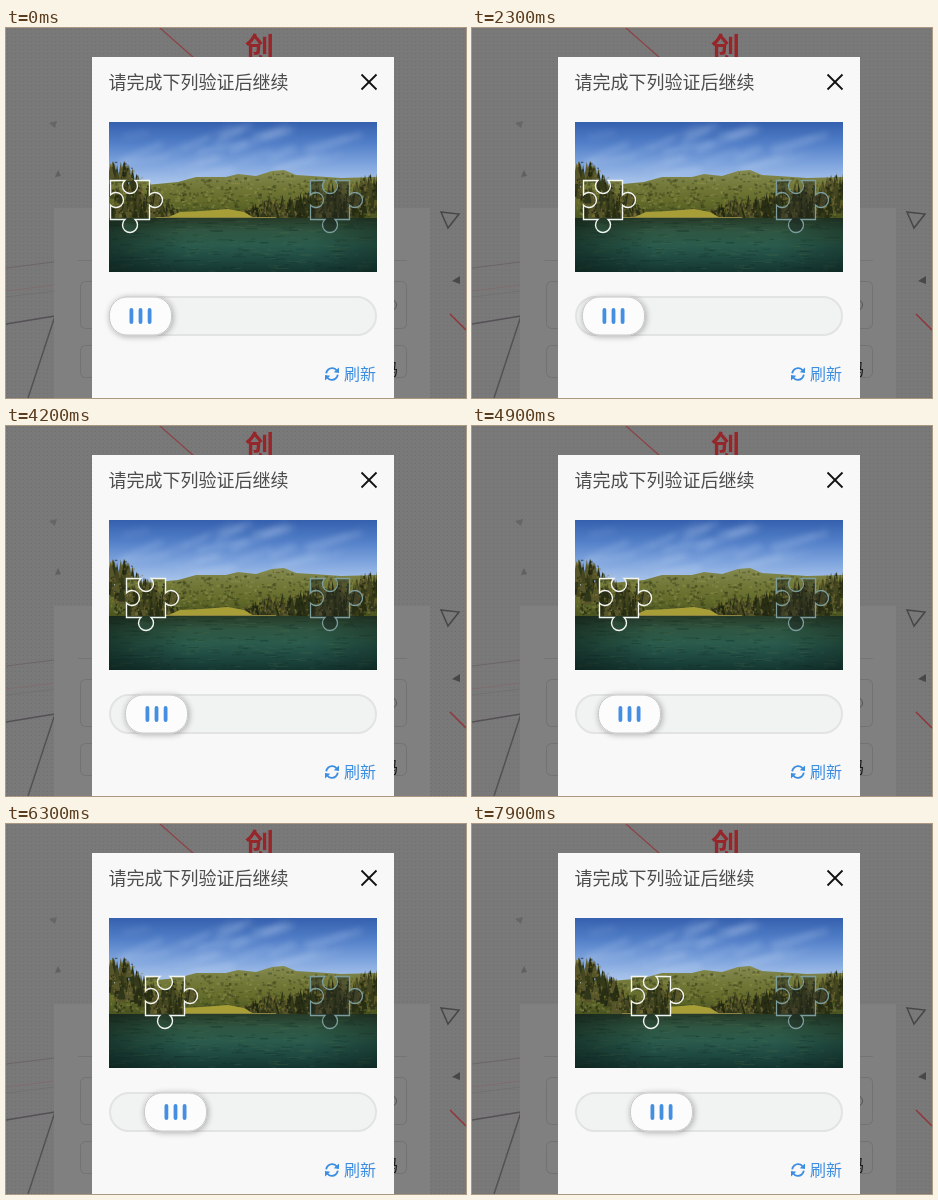
An HTML page with a canvas for the animation above (8 s loop, 460x370 px).

```html
<!DOCTYPE html>
<html lang="zh">
<head>
<meta charset="utf-8">
<style>
html, body { margin: 0; width: 460px; height: 370px; overflow: hidden; background: #777; }
canvas { display: block; }
</style>
</head>
<body>
<canvas id="stage" width="460" height="370"></canvas>
<script>
const W = 460, H = 370, LOOP = 8000;
const SANS = '"Noto Sans CJK SC", "Noto Sans CJK", "Noto Sans", sans-serif';
const PHOTO = { x: 103, y: 94, w: 268, h: 150 };
const HOLE_X = 304, PIECE_X = 104, PIECE_Y = 152;
const ctx = document.getElementById('stage').getContext('2d');

function layer(draw) {
  const canvas = document.createElement('canvas');
  canvas.width = W;
  canvas.height = H;
  draw(canvas.getContext('2d'));
  return canvas;
}

function randomizer(seed) {
  return () => (seed = (seed * 16807) % 2147483647) / 2147483647;
}

function path(c, pts, close) {
  c.beginPath();
  pts.forEach(([x, y]) => c.lineTo(x, y));
  if (close) c.closePath();
}

function strokePath(c, pts, color, width = 1, close = false) {
  path(c, pts, close);
  c.strokeStyle = color;
  c.lineWidth = width;
  c.stroke();
}

function fillPath(c, pts, color) {
  path(c, pts, true);
  c.fillStyle = color;
  c.fill();
}

function roundBox(c, x, y, w, h, r, fill, stroke, width = 1) {
  c.beginPath();
  c.roundRect(x, y, w, h, r);
  if (fill) { c.fillStyle = fill; c.fill(); }
  if (stroke) { c.strokeStyle = stroke; c.lineWidth = width; c.stroke(); }
}

function vertical(c, y0, y1, ...colors) {
  const g = c.createLinearGradient(0, y0, 0, y1);
  colors.forEach((color, i) => g.addColorStop(i / (colors.length - 1), color));
  return g;
}

function text(c, str, x, y, font, color) {
  c.font = `${font} ${SANS}`;
  c.fillStyle = color;
  c.fillText(str, x, y);
}

// Linear interpolation along [x, y] points.
function valueAt(pts, x) {
  const i = Math.max(1, pts.findIndex(p => p[0] >= x));
  const [x0, y0] = pts[i - 1], [x1, y1] = pts[i];
  return y0 + (y1 - y0) * (x - x0) / (x1 - x0);
}

function drawSky(c, rand) {
  c.fillStyle = vertical(c, 94, 158, '#3560ae', '#527fc8', '#7fa5de', '#b0c9ec');
  c.fillRect(PHOTO.x, PHOTO.y, PHOTO.w, 80);
  c.save();
  c.filter = 'blur(3px)';
  c.lineCap = 'round';
  for (let i = 0; i < 26; i++) {
    const x = 105 + rand() * 245, y = 104 + rand() * 44;
    const len = 16 + rand() * 38;
    strokePath(c, [[x, y], [x + len, y - len * (0.15 + rand() * 0.4)]],
      `rgba(205,222,246,${0.1 + rand() * 0.2})`, 2 + rand() * 4);
  }
  c.restore();
}

function drawHills(c, rand) {
  const ridge = [[103, 160], [140, 157], [172, 154], [190, 149], [208, 149], [220, 149],
    [232, 146], [250, 148], [266, 143], [278, 142], [290, 147], [306, 148], [335, 150], [371, 149]];
  fillPath(c, [...ridge, [371, 195], [103, 195]],
    vertical(c, 143, 190, '#848a50', '#727838', '#626a2a', '#4a5420'));
  for (let i = 0; i < 700; i++) {
    const x = 104 + rand() * 266, top = valueAt(ridge, x);
    const y = top + 1 + rand() * (186 - top);
    c.fillStyle = rand() < 0.6 ? 'rgba(48,56,26,.4)' : 'rgba(164,158,86,.3)';
    c.fillRect(x, y, 1 + rand() * 3, 1 + rand() * 1.6);
  }
}

function drawTrees(c, rand) {
  const tops = [[103, 124], [118, 128], [132, 138], [143, 147], [155, 162], [170, 175],
    [185, 180], [232, 178], [246, 170], [260, 166], [280, 165], [298, 158],
    [315, 152], [335, 152], [352, 146], [371, 138]];
  const colors = ['#282e14', '#353a19', '#454720', '#57552a', '#30361a'];
  const topAt = x => valueAt(tops, Math.min(370, Math.max(103, x)));
  for (let i = 0; i < 420; i++) {
    const x = 102 + rand() * 270;
    if (x > 172 && x < 238 && rand() < 0.8) continue;
    const top = topAt(x) + rand() * 28 + rand() * 5;
    if (top > 187) continue;
    const half = 2 + rand() * 2.5;
    const foot = Math.min(191, top + 12 + rand() * 12);
    fillPath(c, [[x, top], [x + half, foot], [x - half, foot]], colors[Math.floor(rand() * 5)]);
  }
  for (let i = 0; i < 520; i++) {
    const x = 104 + rand() * 266, top = topAt(x) + 6;
    c.fillStyle = rand() < 0.5 ? 'rgba(132,120,56,.5)' : 'rgba(22,28,16,.55)';
    c.fillRect(x, top + rand() * Math.max(0, 188 - top), 1 + rand() * 1.5, 1 + rand() * 2);
  }
  fillPath(c, [[158, 191], [174, 184], [196, 183], [222, 181], [238, 184], [250, 191]], '#a89e38');
  c.fillStyle = '#8c8340';
  c.fillRect(150, 189, 120, 1.5);
}

function drawLake(c, rand) {
  c.fillStyle = vertical(c, 190, 244, '#263a28', '#2f5642', '#2a5b4c', '#1f4a42', '#143530');
  c.fillRect(PHOTO.x, 190, PHOTO.w, 54);
  for (let i = 0; i < 260; i++) {
    const x = 100 + rand() * 260, y = 191 + rand() * 52;
    c.fillStyle = rand() < 0.5 ? 'rgba(14,36,30,.25)' : 'rgba(84,116,76,.2)';
    c.fillRect(x, y, 3 + rand() * 12, 1);
  }
  const shade = c.createLinearGradient(103, 0, 371, 0);
  shade.addColorStop(0, 'rgba(8,22,16,.5)');
  shade.addColorStop(0.3, 'rgba(8,22,16,0)');
  shade.addColorStop(0.75, 'rgba(8,22,16,0)');
  shade.addColorStop(1, 'rgba(8,22,16,.35)');
  c.fillStyle = shade;
  c.fillRect(PHOTO.x, 190, PHOTO.w, 54);
}

const photo = layer(c => {
  const rand = randomizer(4711);
  c.beginPath();
  c.rect(PHOTO.x, PHOTO.y, PHOTO.w, PHOTO.h);
  c.clip();
  drawSky(c, rand);
  drawHills(c, rand);
  drawTrees(c, rand);
  drawLake(c, rand);
});

// Square body with notches at top and left, tabs at right and bottom.
function piecePath(c, x, y) {
  const size = 39, mid = 19.5, r = 7.5, neck = 0.75;
  const reach = r * Math.cos(neck), quarter = Math.PI / 2;
  const lobe = (cx, cy, facing, inward) => {
    const a = facing * quarter + Math.PI;
    c.arc(cx, cy, r, inward ? a - neck : a + neck, inward ? a + neck : a - neck, inward);
  };
  c.beginPath();
  c.moveTo(x, y);
  lobe(x + mid, y + reach, 1, true);
  c.lineTo(x + size, y);
  lobe(x + size + reach, y + mid, 0, false);
  c.lineTo(x + size, y + size);
  lobe(x + mid, y + size + reach, 1, false);
  c.lineTo(x, y + size);
  lobe(x + reach, y + mid, 0, true);
  c.closePath();
}

function drawPage(c) {
  c.fillStyle = '#797979';
  c.fillRect(0, 0, W, H);
  c.fillStyle = '#6e6e6e';
  for (let y = 1; y < H; y += 4)
    for (let x = 1; x < W; x += 4) c.fillRect(x, y, 1, 1);

  strokePath(c, [[154, 0], [188, 30]], '#8d4246', 1.2);
  text(c, '创', 239, 31, 'bold 29px', '#96262a');
  for (const [y, color] of [[240, '#6e6466'], [263, '#806d6e'], [269, '#717171']])
    strokePath(c, [[0, y], [48, y - 6]], color);
  strokePath(c, [[0, 296], [49, 288], [22, 370]], '#555055', 1.5);
  fillPath(c, [[43, 95], [51, 93], [49, 100]], '#666');
  fillPath(c, [[49, 149], [52, 142], [55, 148]], '#606060');

  c.fillStyle = '#808080';
  c.fillRect(48, 180, 376, 190);
  strokePath(c, [[72, 232.5], [401, 232.5]], '#747474');
  roundBox(c, 74.5, 253.5, 326, 47, 5, null, '#727272');
  roundBox(c, 74.5, 317.5, 326, 32, 5, null, '#727272');
  c.beginPath();
  c.arc(385, 277, 5.5, 0, 7);
  c.strokeStyle = '#555';
  c.lineWidth = 1;
  c.stroke();
  text(c, '码', 376, 347, '16px', '#181818');

  strokePath(c, [[435, 184], [453, 186], [442, 200]], '#484648', 1.5, true);
  fillPath(c, [[446, 253], [454, 248], [454, 256]], '#484848');
  strokePath(c, [[444, 286], [460, 302]], '#913338', 1.5);
}

function drawRefreshIcon(c, x, y) {
  const blue = '#3d8de0';
  for (const turn of [0, Math.PI]) {
    c.save();
    c.translate(x, y);
    c.rotate(turn);
    c.beginPath();
    c.arc(0, 0, 5.8, Math.PI * 1.03, Math.PI * 1.8);
    c.strokeStyle = blue;
    c.lineWidth = 1.8;
    c.stroke();
    fillPath(c, [[7, -6.5], [7, -1], [1.8, -1.8]], blue);
    c.restore();
  }
}

function drawDialog(c) {
  c.fillStyle = '#f8f8f8';
  c.fillRect(86, 29, 302, 341);
  text(c, '请完成下列验证后继续', 102.5, 61, '300 18px', '#4c4c4c');
  strokePath(c, [[355.5, 46.5], [370.5, 61.5]], '#111', 1.8);
  strokePath(c, [[370.5, 46.5], [355.5, 61.5]], '#111', 1.8);

  c.drawImage(photo, 0, 0);
  piecePath(c, HOLE_X + 0.5, PIECE_Y + 0.5);
  c.fillStyle = 'rgba(28,34,34,.4)';
  c.fill();
  c.strokeStyle = '#7c9d9b';
  c.lineWidth = 1.3;
  c.stroke();

  roundBox(c, 104, 269, 266, 38, 19, '#f0f3f2', '#e2e4e3', 2);
  drawRefreshIcon(c, 326, 346);
  text(c, '刷新', 338, 352, '16px', '#3d8de0');
}

const backdrop = layer(c => {
  drawPage(c);
  drawDialog(c);
});

function drawPiece(c, shift) {
  piecePath(c, PIECE_X + shift + 0.5, PIECE_Y + 0.5);
  c.save();
  c.clip();
  c.drawImage(photo, PIECE_X + shift - HOLE_X, 0);
  c.restore();
  c.strokeStyle = '#f2f5f0';
  c.lineWidth = 1.4;
  c.stroke();
}

function drawKnob(c, shift) {
  const x = 103 + shift;
  c.save();
  c.shadowColor = 'rgba(0,0,0,.32)';
  c.shadowBlur = 6;
  c.shadowOffsetX = 1;
  c.shadowOffsetY = 1;
  roundBox(c, x, 268.5, 63, 39, 18, '#fcfcfc');
  c.restore();
  roundBox(c, x + 0.5, 269, 62, 38, 17.5, null, '#c6c6c6');
  for (let i = 0; i < 3; i++)
    roundBox(c, x + 20.5 + i * 9.1, 280, 3.8, 16, 1.9, '#458fe3');
}

// Moves come 200 ms apart in short groups with a 300 ms pause after each.
const ticks = [900];
for (const [start, moves] of [[1200, 3], [1900, 3], [2600, 4]])
  for (let i = 0; i < moves; i++) ticks.push(start + i * 200);
for (let start = 3500; start < LOOP; start += 700)
  for (let t = start; t <= start + 400 && t < LOOP; t += 200) ticks.push(t);

// Uneven hand drag: [moves made, pixels dragged].
const DRAG = [[0, 0], [14, 14], [18, 23], [20, 25], [24, 35], [26, 37], [29, 49], [31, 55]];

function shiftAt(time) {
  return Math.round(valueAt(DRAG, ticks.filter(t => t <= time).length));
}

function render(now) {
  const shift = shiftAt(now % LOOP);
  ctx.drawImage(backdrop, 0, 0);
  drawPiece(ctx, shift);
  drawKnob(ctx, shift);
  requestAnimationFrame(render);
}

render(0);
</script>
</body>
</html>
```
